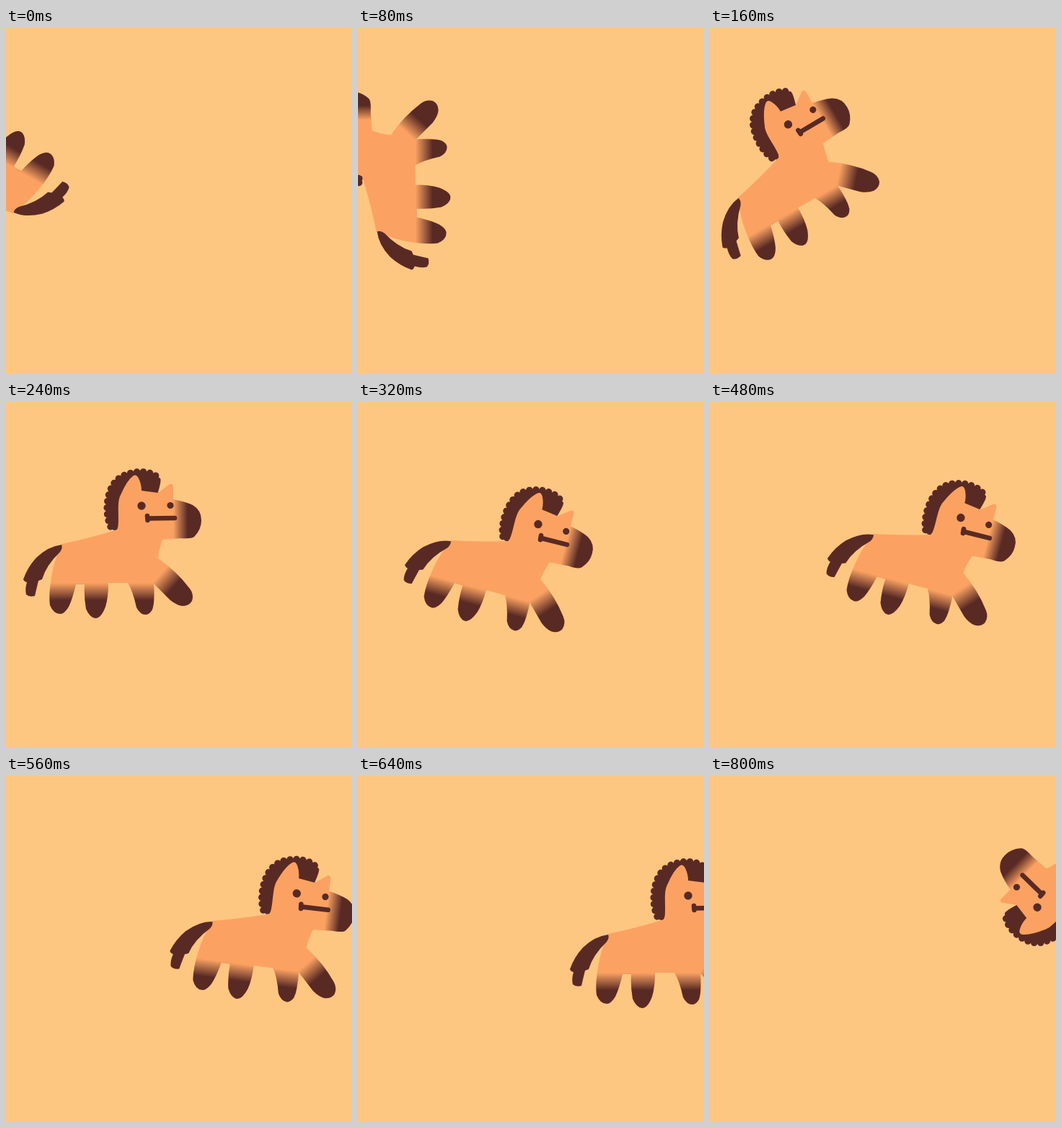
Write an HTML page that moves like this. It is 480 by 480 pixels and loops after 0.88 s.

```html
<!DOCTYPE html>
<html lang="en">
<head>
<meta charset="utf-8">
<title>Tumbling pony</title>
<style>
  html, body { margin: 0; width: 100%; height: 100%; overflow: hidden; background: #fdc681; }
  svg { display: block; width: 100%; height: 100%; }
  .dark { fill: #592a24; }
  .line { fill: none; stroke: #592a24; stroke-linecap: round; stroke-linejoin: round; }
</style>
</head>
<body>
<svg viewBox="0 0 480 480">
  <defs>
    <path id="body" d="M77 197 Q112 190 155 177 C158 160 153 140 159 129 Q168 108 177 102 Q181 100 184 106 Q188 114 188 123
      L211 126 L227 114 Q231 112 232 117 L232 135 Q248 138 259 143 Q271 150 271 164 Q271 176 262 186 Q259 190 243 189
      L217 191 Q212 205 211 217 Q237 235 255 259 Q261 267 258 276 Q254 283 245 283 Q237 282 228 275 L205 252
      Q207 276 203 288 Q199 295 194 295 Q186 295 181 285 Q176 262 169 251 L142 251 Q142 271 138 284 Q132 300 124 300
      Q116 299 111 287 Q108 270 109 253 L97 253 Q92 274 87 284 Q81 294 75 294 Q66 294 61 282 Q59 267 63 243 Q66 222 77 197Z"/>
    <clipPath id="inside"><use href="#body"/></clipPath>
    <linearGradient id="legs" gradientUnits="userSpaceOnUse" x1="0" y1="251" x2="0" y2="275">
      <stop stop-color="#592a24" stop-opacity="0"/><stop offset="1" stop-color="#592a24"/>
    </linearGradient>
    <linearGradient id="foreleg" href="#legs" x1="215" y1="238" x2="234" y2="255"/>
    <linearGradient id="nose" href="#legs" x1="232" y1="0" x2="252" y2="0"/>
  </defs>
  <g id="pony">
    <path class="dark" d="M154 177 Q149 180 145 174 C138 158 138 130 149 114 C158 100 178 96 191 97 Q204 98 214 106 Q216 109 210 128 L170 140Z"/>
    <path class="line" stroke-width="9.500" stroke-dasharray="0 9" d="M145 173 C138 158 138 130 149 114 C158 100 178 96 191 97 Q204 98 211 105"/>
    <use href="#body" fill="#fba262"/>
    <g clip-path="url(#inside)">
      <path fill="url(#legs)" d="M50 245H205V300H50Z"/>
      <path fill="url(#foreleg)" d="M205 215H265V290H205Z"/>
      <path fill="url(#nose)" d="M228 130H275V195H228Z"/>
    </g>
    <path class="dark" d="M77 198 Q59 200 42 216 Q30 229 24 246 Q25 249 29 250 Q26 260 28 267 Q32 271 40 269 Q42 260 45 248
      L50 246 Q56 226 75 208 Q79 202 77 198Z"/>
    <circle class="dark" cx="188" cy="144" r="5.700"/>
    <circle class="dark" cx="228" cy="143.500" r="4.600"/>
    <path class="line" stroke-width="6.600" d="M196 158 L196.500 164 V161.500 L234 161"/>
  </g>
</svg>
<script>
  const STEP = 80, STEPS = 11;
  // The tumble in, the gallop and the tumble out; steps in between are interpolated.
  const keys = [
    { at: 0, x: -54, y: 222, tilt: -150 },
    { at: 2, x: 101, y: 197, tilt: -30 },
    { at: 3, x: 150, y: 195, tilt: 0 },
    { at: 4, x: 200, y: 209, tilt: 15 },
    { at: 6, x: 298, y: 200, tilt: 15 },
    { at: 8, x: 420, y: 217, tilt: 0 },
    { at: 10, x: 517, y: 173, tilt: -135 }
  ];
  const pony = document.getElementById('pony');

  function poseAt(step) {
    const next = Math.max(1, keys.findIndex(key => key.at >= step));
    const a = keys[next - 1], b = keys[next];
    const part = (step - a.at) / (b.at - a.at);
    const mix = name => a[name] + (b[name] - a[name]) * part;
    return { x: mix('x'), y: mix('y'), tilt: mix('tilt') };
  }

  function draw(now) {
    const { x, y, tilt } = poseAt(Math.floor(now / STEP) % STEPS);
    pony.setAttribute('transform', `translate(${x} ${y}) rotate(${tilt}) translate(-150 -195)`);
    requestAnimationFrame(draw);
  }
  draw(performance.now());
</script>
</body>
</html>
```
